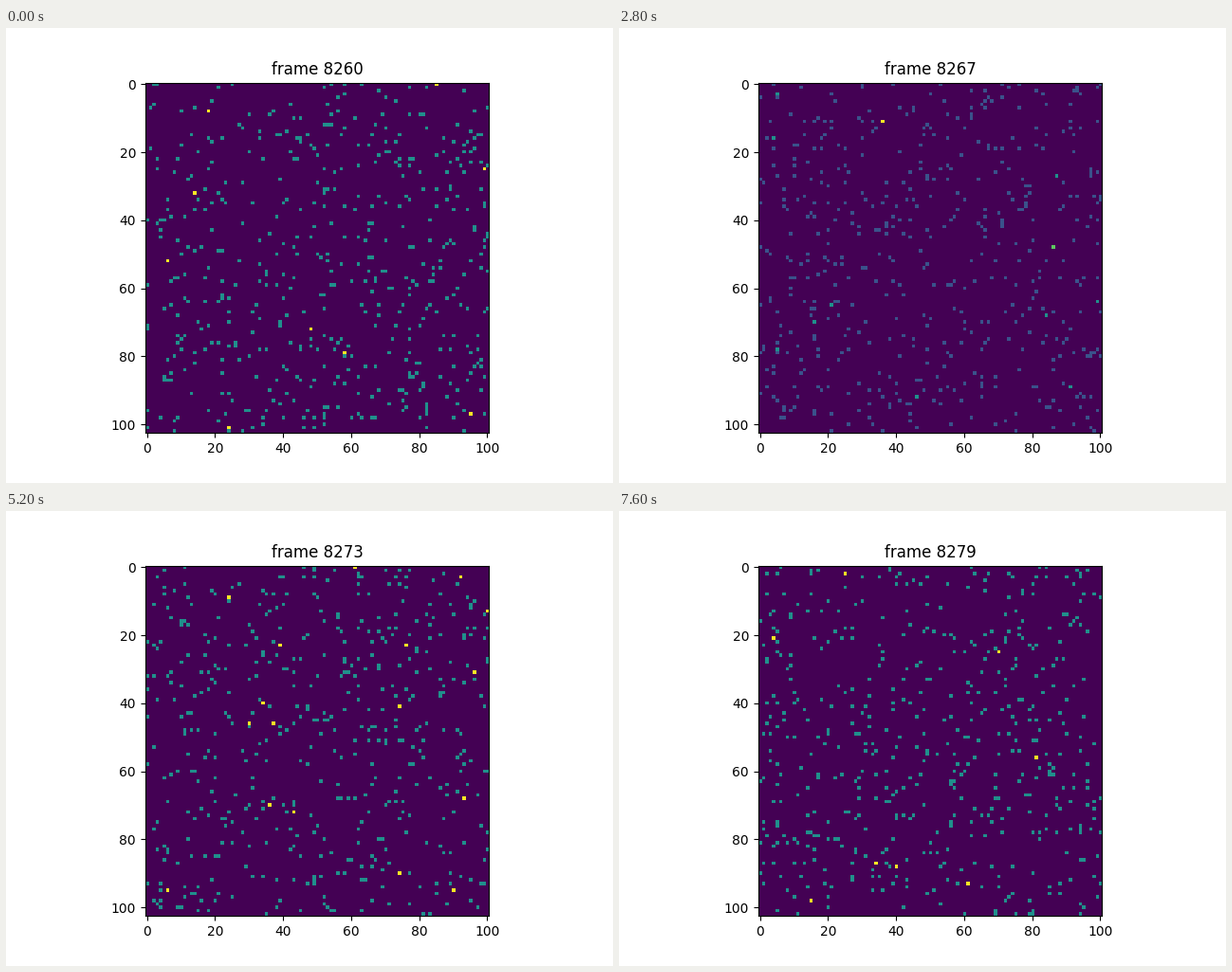
A matplotlib script for the animation above (8 s loop, 640 px wide and 480 px high).

```python
import matplotlib.pyplot as plt
import numpy as np
from matplotlib.animation import FuncAnimation

SIZE = np.array([101, 103])
ROBOTS, TOP_SPEED = 500, 99
START, STEPS, INTERVAL = 8260, 20, 400
CROWD_STEP = 7
CROWDS = [((36, 11), 4), ((86, 48), 3)]


def count_robots():
    """Robots per cell at every step, for robots that wrap at the edges.

    Only the crowds hold more than two robots in one cell.
    """
    rng = np.random.default_rng(14)
    steps = np.arange(STEPS)
    counts = np.zeros((STEPS, SIZE[1], SIZE[0]), int)

    def add_robot(crowd=None):
        while True:
            place = rng.integers(SIZE) if crowd is None else crowd
            speed = rng.integers(-TOP_SPEED, TOP_SPEED + 1, 2)
            path = (place + np.outer(steps - CROWD_STEP, speed)) % SIZE
            cells = steps, path[:, 1], path[:, 0]
            full = counts[cells] >= 2
            if crowd is not None:
                full[CROWD_STEP] = False
            if not full.any():
                counts[cells] += 1
                return

    for cell, number in CROWDS:
        for _ in range(number):
            add_robot(cell)
    while counts[0].sum() < ROBOTS:
        add_robot()
    return counts


counts = count_robots()

fig, ax = plt.subplots(figsize=(6.4, 4.8), dpi=100)
image = ax.imshow(counts[0], cmap="viridis", interpolation="nearest")
title = ax.set_title("")


def draw(step):
    image.set_data(counts[step])
    image.set_clim(0, counts[step].max())
    title.set_text(f"frame {START + step}")
    return image, title


anim = FuncAnimation(fig, draw, frames=STEPS, init_func=lambda: draw(0),
                     interval=INTERVAL, repeat=True, repeat_delay=0)
plt.show()
```
